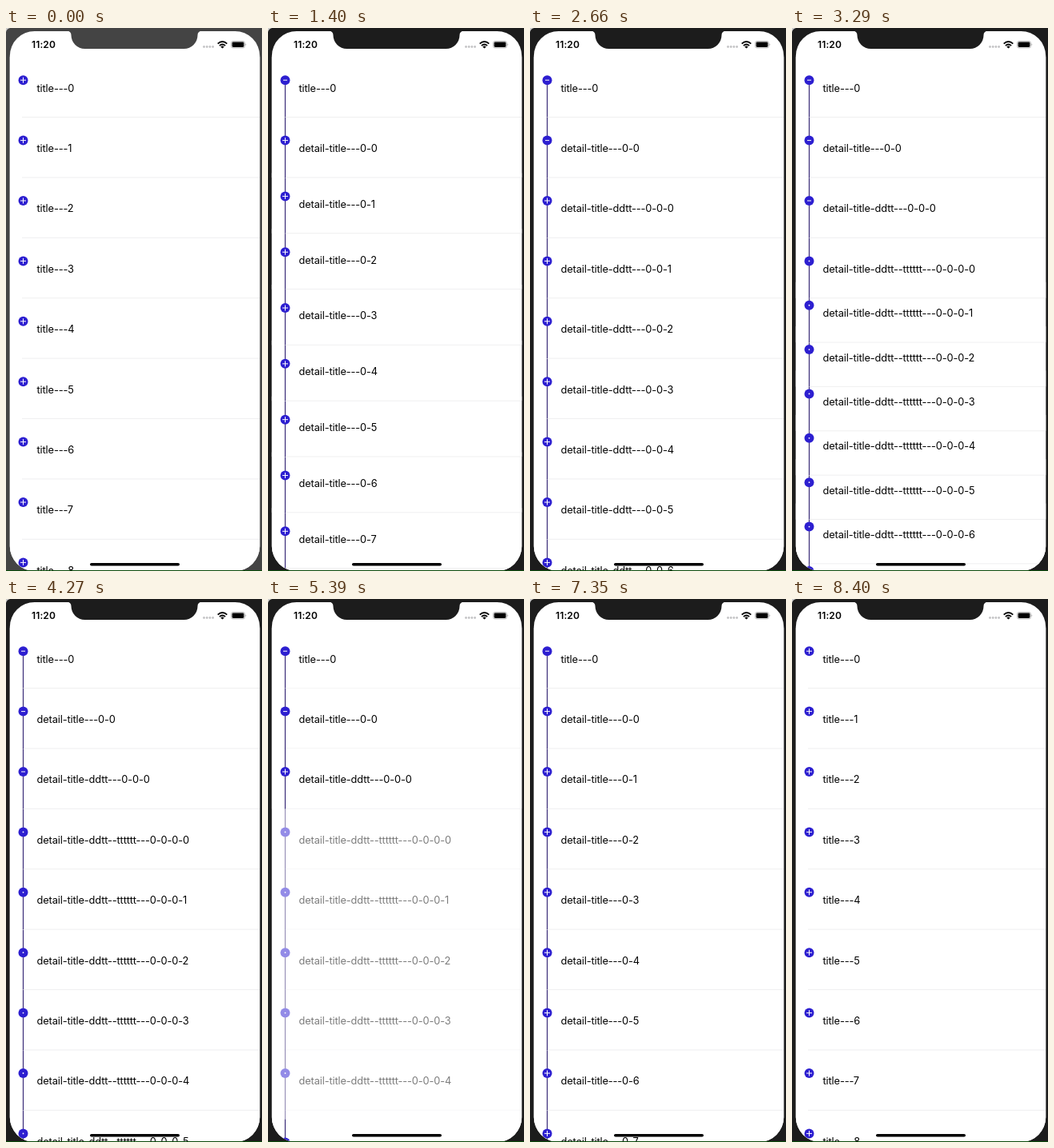
Recreate the animation shown at these times as an HTML page. Size 320 by 679 pixels, loop 9030 ms.

```html
<!DOCTYPE html>
<html lang="en">
<head>
<meta charset="utf-8">
<title>Expandable list</title>
<style>
html, body { margin: 0; width: 100%; height: 100%; overflow: hidden; background: #1c1c1c; }
svg { display: block; width: 320px; height: 679px; }
text { font: 12.8px Inter, "Liberation Sans", sans-serif; letter-spacing: -.13px; font-feature-settings: "calt" 0; }
.clock { font-size: 12px; font-weight: 600; letter-spacing: .1px; }
.mark { stroke: #fff; stroke-width: 1; }
</style>
</head>
<body>
<svg viewBox="0 0 320 679">
  <defs>
    <clipPath id="screen"><rect x="4.800" y="4" width="312.400" height="675" rx="31"/></clipPath>
  </defs>
  <rect id="bezel" width="320" height="679"/>
  <path d="M0 0H5Q1 1 0 5Z" fill="#ccc"/>
  <g clip-path="url(#screen)">
    <rect width="320" height="679" fill="#fff"/>
    <g id="list"></g>
  </g>
  <path id="notch" d="M76 3.500Q81.500 4 81.500 9A17 17 0 0 0 98.500 26H222.500A17 17 0 0 0 239.500 9Q239.500 4 245 3.500Z"/>
  <text class="clock" x="47" y="25" text-anchor="middle">11:20</text>
  <g fill="#c4c4c6">
    <circle cx="247.500" cy="23.500" r="1.400"/><circle cx="251.200" cy="23.500" r="1.400"/>
    <circle cx="254.900" cy="23.500" r="1.400"/><circle cx="258.600" cy="23.500" r="1.400"/>
  </g>
  <g fill="none" stroke="#000" stroke-width="1.900">
    <path d="M264.700 19.600Q270.500 14.600 276.300 19.600M266.900 22.100Q270.500 19 274.100 22.100"/>
  </g>
  <path d="M268.300 23.400Q270.500 21.700 272.700 23.400L270.500 25.600Z"/>
  <rect x="281.500" y="16.500" width="17" height="8.500" rx="2.400" fill="none" stroke="#aaa" stroke-width=".8"/>
  <rect x="282.600" y="17.600" width="14.800" height="6.300" rx="1.400"/>
  <path d="M299.500 19.300Q301.300 20.700 299.500 22.200Z" fill="#999"/>
  <rect x="105" y="669" width="112" height="3.600" rx="1.800"/>
  <rect y="678" width="320" height="1" fill="#0b4a0b"/>
</svg>
<script>
const LOOP = 9030, STEP = 70, SLIDE = 408, ROW = 75.4, TOP = 36.2, COUNT = 10;
const titles = ['title', 'detail-title', 'detail-title-ddtt', 'detail-title-ddtt--tttttt'];
// When the first row of each level opens and closes.
const spans = [[1060, 7780], [1970, 6800], [3020, 5190]];
const byId = id => document.getElementById(id);
const bezel = byId('bezel'), notch = byId('notch'), list = byId('list');

function ease(t) {
  const u = Math.min(1, Math.max(0, t / SLIDE));
  return u * u * (3 - 2 * u);
}

function rowSvg({ level, path, pos, open, opacity }) {
  const y = TOP + pos * ROW;
  const sign = level === 3 ? '<circle cx="21.5" cy="29" r=".9" fill="#fff"/>'
    : `<path class="mark" d="${open ? 'M19 29h5' : 'M18 29h7M21.5 25.500v7'}"/>`;
  const lineTop = level ? 0 : 29;
  const line = level || open
    ? `<path d="M21.5 ${lineTop}V${ROW}" stroke="#3a2c78" stroke-width="1.200"/>` : '';
  return `<g transform="translate(0 ${y.toFixed(2)})" opacity="${opacity}">
    <rect width="320" height="${ROW}" fill="#fff"/>
    <path d="M20 ${ROW - .1}H317" stroke="#ebebed" stroke-width=".8"/>${line}
    <circle cx="21.5" cy="29" r="6" fill="#2d1fd0"/>${sign}
    <text x="38.500" y="43.400">${titles[level]}---${path.join('-')}</text></g>`;
}

function layout(t) {
  const rows = [];
  const amount = spans.map(([start, end]) => ease(t - start) - ease(t - end));
  const height = level => level < spans.length ? amount[level] * (COUNT + height(level + 1)) : 0;
  // Opening rows spread out from their parent; closing rows fade in place.
  function addGroup(level, parent, top, spread, opacity) {
    let pos = top;
    for (let i = 0; i < COUNT; i++) {
      const path = [...parent, i], span = spans[level];
      const open = i === 0 && !!span && t >= span[0] && t < span[1];
      rows.push({ level, path, pos, open, opacity });
      pos += spread;
      if (i === 0 && height(level) > 0) {
        addGroup(level + 1, path, pos, open ? amount[level] : 1, open ? 1 : amount[level]);
        pos += height(level);
      }
    }
  }
  addGroup(0, [], 0, 1, 1);
  return rows;
}

function render(t) {
  const rows = layout(t).filter(row => row.pos < 9);
  const closing = spans.some(([, end]) => t >= end && t < end + SLIDE);
  if (!closing) rows.reverse();
  list.innerHTML = rows.map(rowSvg).join('');
  const shade = t < 1120 ? '#444' : '#1c1c1c';
  bezel.setAttribute('fill', shade);
  notch.setAttribute('fill', shade);
}

let shown = -1;
const begin = performance.now();
function tick() {
  const t = Math.floor((performance.now() - begin) % LOOP / STEP) * STEP;
  if (t !== shown) render(shown = t);
  requestAnimationFrame(tick);
}
tick();
</script>
</body>
</html>
```
